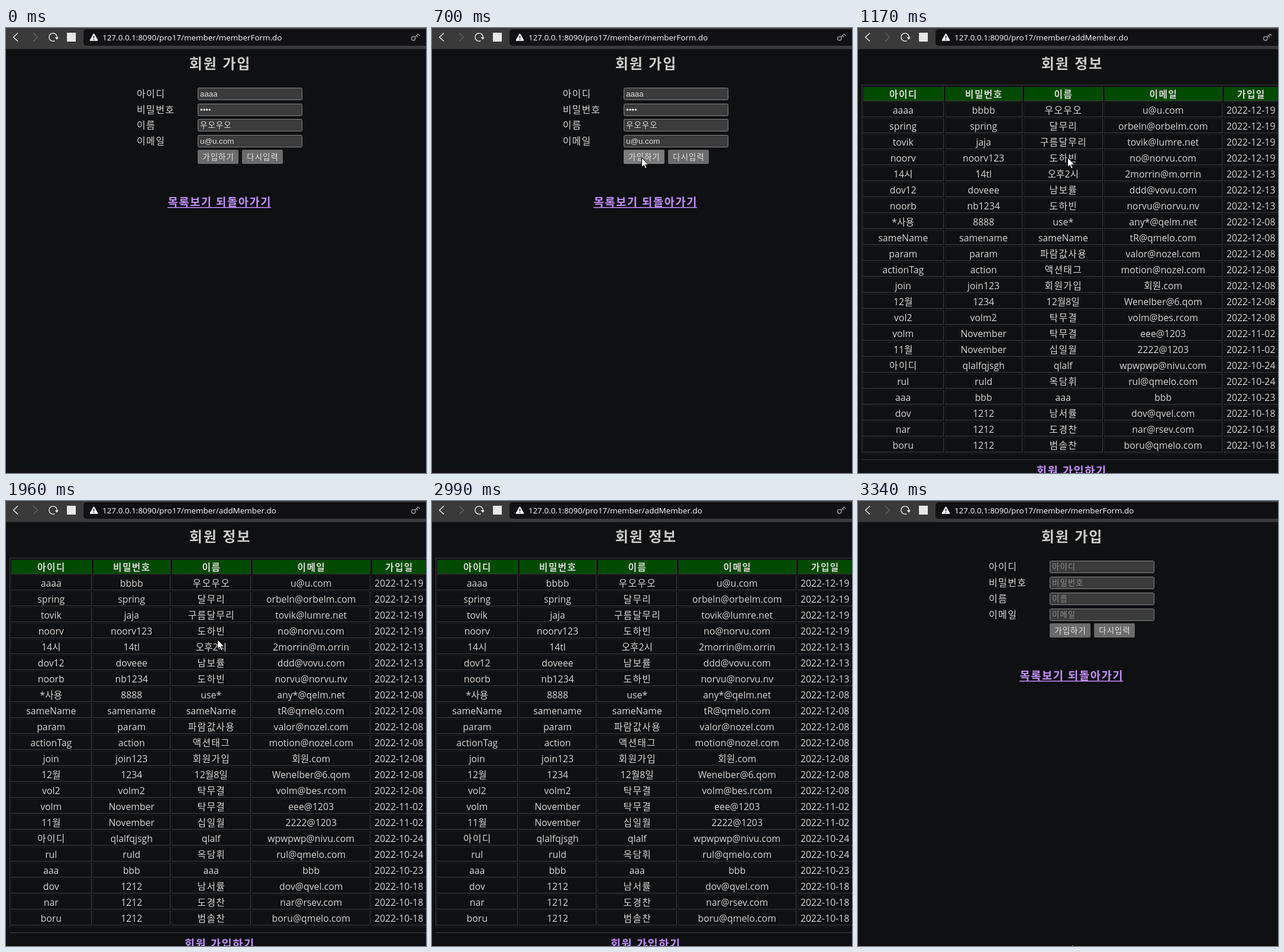
Animation, 710 px wide and 753 px high, one loop 3800 ms. Source, as an HTML page with a canvas:

```html
<!DOCTYPE html>
<html lang="ko">
<head>
<meta charset="utf-8">
<title>회원 가입</title>
<style>
html, body { margin: 0; width: 100%; height: 100%; overflow: hidden; background: #0f1012; }
canvas { display: block; }
</style>
</head>
<body>
<canvas id="stage" width="710" height="753"></canvas>
<script>
const c = document.getElementById('stage').getContext('2d');
const LOOP = 3800;
const UI = '"Open Sans", "Noto Sans CJK KR", sans-serif';
const FIELD = '"Liberation Sans", "Noto Sans CJK KR", sans-serif';
const INK = '#d8d6d3', PAGE = '#0f1012', LINK = '#c58fff';
const EDGE_DARK = '#1a1b1c', EDGE_LIGHT = '#3c3d3e';

const labels = ['아이디', '비밀번호', '이름', '이메일'];
const values = ['aaaa', '••••', '우오우오', 'u@u.com'];
const columns = [[8, 145], [147, 278], [280, 414], [416, 616], [618, 711]];
const rows = `아이디 비밀번호 이름 이메일 가입일
aaaa bbbb 우오우오 u@u.com 2022-12-19
spring spring 달무리 orbeln@orbelm.com 2022-12-19
tovik jaja 구름달무리 tovik@lumre.net 2022-12-19
noorv noorv123 도하빈 no@norvu.com 2022-12-19
14시 14tl 오후2시 2morrin@m.orrin 2022-12-13
dov12 doveee 남보률 ddd@vovu.com 2022-12-13
noorb nb1234 도하빈 norvu@norvu.nv 2022-12-13
*사용 8888 use* any*@qelm.net 2022-12-08
sameName samename sameName tR@qmelo.com 2022-12-08
param param 파람값사용 valor@nozel.com 2022-12-08
actionTag action 액션태그 motion@nozel.com 2022-12-08
join join123 회원가입 회원.com 2022-12-08
12월 1234 12월8일 Wenelber@6.qom 2022-12-08
vol2 volm2 탁무결 volm@bes.rcom 2022-12-08
volm November 탁무결 eee@1203 2022-11-02
11월 November 십일월 2222@1203 2022-11-02
아이디 qlalfqjsgh qlalf wpwpwp@nivu.com 2022-10-24
rul ruld 옥담휘 rul@qmelo.com 2022-10-24
aaa bbb aaa bbb 2022-10-23
dov 1212 남서률 dov@qvel.com 2022-10-18
nar 1212 도경찬 nar@rsev.com 2022-10-18
boru 1212 범솔찬 boru@qmelo.com 2022-10-18`.split('\n').map(line => line.split(' '));

function text(str, x, y, size, { color = INK, align = 'left', weight = 400, family = UI } = {}) {
  const spacing = /^[가-힣 ]+$/.test(str) ? size * 0.085 : 0;
  c.font = `${weight} ${size}px ${family}`;
  c.letterSpacing = spacing + 'px';
  c.textAlign = align;
  c.fillStyle = color;
  c.fillText(str, align === 'center' ? x + spacing / 2 : x, y);
}

function rect(x, y, w, h, color) {
  c.fillStyle = color;
  c.fillRect(x, y, w, h);
}

function rounded(x, y, w, h, r, fill, stroke) {
  c.beginPath();
  c.roundRect(x, y, w, h, r);
  c.fillStyle = fill;
  c.fill();
  if (stroke) {
    c.strokeStyle = stroke;
    c.lineWidth = 1;
    c.stroke();
  }
}

function line(points, color, width = 1) {
  c.beginPath();
  points.forEach(([x, y]) => c.lineTo(x, y));
  c.strokeStyle = color;
  c.lineWidth = width;
  c.stroke();
}

function bevel(x0, y0, x1, y1, topLeft, bottomRight) {
  rect(x0, y0, x1 - x0, 1, topLeft);
  rect(x0, y0, 1, y1 - y0, topLeft);
  rect(x0, y1 - 1, x1 - x0, 1, bottomRight);
  rect(x1 - 1, y0, 1, y1 - y0, bottomRight);
}

function drawToolbar(path, loading, hasKey) {
  rect(0, 0, 710, 35, '#3a3a3b');
  rect(0, 35, 710, 1, '#2b2b2c');
  line([[20, 8.5], [12.5, 15.5], [20, 22.5]], '#f2f2f2', 1.3);
  line([[46, 8.5], [53.5, 15.5], [46, 22.5]], '#666', 1.2);
  if (loading) {
    line([[74.5, 10.5], [84.5, 20.5]], '#f2f2f2', 1.3);
    line([[84.5, 10.5], [74.5, 20.5]], '#f2f2f2', 1.3);
  } else {
    c.beginPath();
    c.arc(79.5, 15.5, 6.7, Math.PI * 0.36, Math.PI * 2.06);
    c.strokeStyle = '#f2f2f2';
    c.lineWidth = 1.3;
    c.stroke();
    c.beginPath();
    c.moveTo(82.6, 15.8);
    c.lineTo(88.8, 15.8);
    c.lineTo(85.8, 19.8);
    c.fillStyle = '#f2f2f2';
    c.fill();
  }
  rounded(103, 8, 15, 15, 0, '#e8e8e8');
  rounded(131, 2, 600, 28, 5, '#111113');

  c.lineJoin = 'round';
  c.beginPath();
  c.moveTo(148.5, 10.5);
  c.lineTo(154.3, 20.8);
  c.lineTo(142.7, 20.8);
  c.closePath();
  c.fillStyle = c.strokeStyle = '#fff';
  c.lineWidth = 2;
  c.fill();
  c.stroke();
  c.lineJoin = 'miter';
  rect(147.8, 13, 1.5, 4.5, '#111113');
  rect(147.8, 18.7, 1.5, 1.6, '#111113');

  text('127.0.0.1:8090/pro17/member/' + path, 163, 21, 13.45, { color: '#fff' });
  if (hasKey) {
    c.beginPath();
    c.arc(688.8, 17.7, 3.2, 0, Math.PI * 2);
    c.strokeStyle = '#919191';
    c.lineWidth = 1.5;
    c.stroke();
    line([[691.2, 15.4], [696.6, 10.2], [699.5, 13.2]], '#919191', 1.5);
    line([[693.8, 12.9], [696.4, 15.6]], '#919191', 1.5);
  }
}

function drawHeading(str) {
  text(str, 361, 69, 24, { align: 'center', weight: 700, color: '#cfcdca' });
}

function drawButton(str, x, y, fill) {
  rounded(x, y, 69, 24, 2, fill);
  text(str, x + 34.5, y + 17, 13.33, { align: 'center', color: '#e0e0e0' });
}

function drawForm(filled, buttonFill) {
  const shift = filled ? 0 : 1;
  drawHeading('회원 가입');
  labels.forEach((label, i) => {
    const y = 101 + 27 * i - (filled && i > 1 ? 1 : 0);
    text(label, 221, y + 16, 16);
    rounded(324.5, y + 0.5, 176, 20, 2, '#3b3b3b', '#858585');
    text(filled ? values[i] : label, 328, y + 15, 13.33, {
      family: FIELD, color: filled ? '#dedede' : '#8c8c8c'
    });
  });
  drawButton('가입하기', 324, 206 + shift, buttonFill);
  drawButton('다시입력', 399, 206 + shift, '#6b6b6b');
  text('목록보기 되돌아가기', 360.5, 301 + shift, 18.72, { align: 'center', weight: 700, color: LINK });
  rect(273, 303 + shift, 175, 1.5, LINK);
  rect(0, 748, 710, 5, '#110f12');
}

function drawTable(linkColor) {
  drawHeading('회원 정보');
  bevel(6, 96, 714, 721, EDGE_LIGHT, EDGE_DARK);
  rows.forEach((row, r) => {
    const y = 99 + 27 * r;
    row.forEach((str, i) => {
      const [x0, x1] = columns[i];
      if (!r) rect(x0, y, x1 - x0, 25, '#004b00');
      bevel(x0, y, x1, y + 25, EDGE_DARK, EDGE_LIGHT);
      text(str, (x0 + x1) / 2 - 0.3, y + 19, 15.8, { align: 'center', weight: r ? 400 : 700 });
    });
  });
  rect(6, 730, 704, 1, EDGE_LIGHT);
  text('회원 가입하기', 360.5, 756, 18.72, { align: 'center', weight: 700, color: linkColor });
}

// The pointer is sampled about every 70 ms, as in a screen recording.
const smooth = u => u * u * (3 - 2 * u);
const overText = y => Math.abs((y - 125.5) % 27 - 13.5) < 8;

function pointer(t) {
  if (t < 130) return null;
  if (t < 1960) {
    const u = Math.min(8, Math.floor((t - 130) / 71.25)) / 8;
    const rest = (1 - u) ** 2.17;
    return { x: 354 + 156 * rest, y: 219 + 379 * rest, shape: t < 1230 ? 'arrow' : 'beam' };
  }
  if (t < 2520) {
    const u = (Math.floor((t - 1960) / 70) + 1) / 8;
    const y = 220 + 436 * smooth(u * 0.8) / smooth(0.8);
    return { x: 354 + 7 * u + 6 * Math.sin(Math.PI * u), y, shape: overText(y) ? 'beam' : 'arrow' };
  }
  const y = t < 2590 ? 697 : t < 2660 ? 729 : t < 2730 ? 745 : t < 2990 ? 749 : 750;
  return { x: 361, y, shape: t >= 2660 && t < 3340 ? 'hand' : 'arrow' };
}

function drawPointer({ x, y, shape }) {
  c.save();
  c.translate(Math.round(x), Math.round(y));
  if (shape === 'beam') {
    rect(1, -7, 1, 16, '#eee');
    for (const edge of [-7, 8]) {
      rect(-2, edge, 3, 1, '#eee');
      rect(2, edge, 3, 1, '#eee');
    }
  } else if (shape === 'hand') {
    rounded(-0.5, 0.5, 4, 14, 2, '#fff', '#000');
  } else {
    c.beginPath();
    [[0.5, 0.5], [0.5, 16.5], [4.2, 13.2], [6.8, 19], [9.2, 18], [6.7, 12.2], [11.8, 12.2]]
      .forEach(p => c.lineTo(...p));
    c.closePath();
    c.fillStyle = '#fff';
    c.strokeStyle = '#000';
    c.lineWidth = 1;
    c.fill();
    c.stroke();
  }
  c.restore();
}

function draw(t) {
  const listing = t >= 1170 && t < 3340;
  const done = t >= 3340;
  const loading = (t >= 1100 && t < 1170) || (t >= 3270 && t < 3340);
  const p = pointer(t);
  rect(0, 0, 710, 753, PAGE);
  drawToolbar(listing ? 'addMember.do' : 'memberForm.do', loading, !done);
  if (listing) {
    drawTable(t >= 3140 && t < 3270 ? '#ff9e9e' : LINK);
  } else {
    const hover = p && p.x < 393 && p.y < 230;
    const pressed = t >= 970 && t < 1100;
    drawForm(!done, pressed ? '#646464' : hover ? '#7b7b7b' : '#6b6b6b');
  }
  if (p) drawPointer(p);
}

const start = performance.now();
function tick() {
  draw((performance.now() - start) % LOOP);
  requestAnimationFrame(tick);
}
tick();
</script>
</body>
</html>
```
